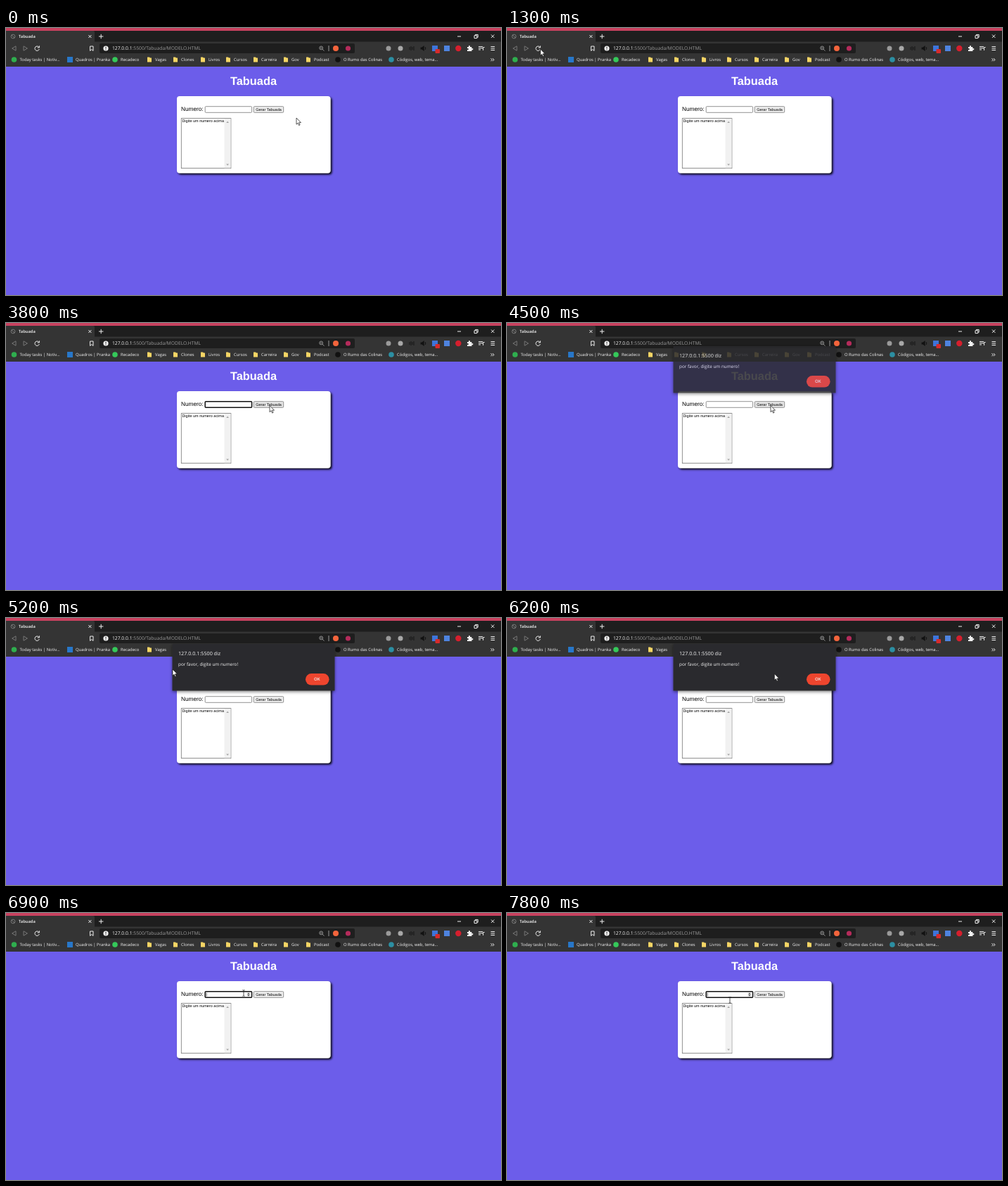
An HTML page for the animation above (8 s loop, 704 by 380 pixels).

```html
<!DOCTYPE html>
<html lang="pt-BR">
<head>
<meta charset="utf-8">
<title>Tabuada</title>
<style>
  html, body { margin: 0; width: 100%; height: 100%; overflow: hidden; background: #6c5dea; }
  svg { display: block; width: 704px; height: 380px; }
  text { white-space: pre; text-rendering: geometricPrecision; }
  .ui { font-family: "Open Sans", "Noto Sans", sans-serif; fill: #f4f4f4; }
  .page { font-family: "Liberation Sans", Arial, sans-serif; fill: #000; }
  .line { fill: none; stroke: #eee; stroke-width: 1; }
  .dim { stroke: #777; }
  .small { font-size: 5.9px; }
  .form { font-size: 5.5px; }
</style>
</head>
<body>
<svg viewBox="0 0 704 380">
  <defs>
    <filter id="cardShadow" x="-10%" y="-10%" width="120%" height="125%">
      <feDropShadow dx="2" dy="2" stdDeviation="1.6" flood-color="#000"/>
    </filter>
    <filter id="boxShadow" x="-10%" y="-20%" width="120%" height="150%">
      <feDropShadow dx="0" dy="1.5" stdDeviation="2" flood-color="#000" flood-opacity=".5"/>
    </filter>
  </defs>

  <!-- Page -->
  <rect width="704" height="380" fill="#6c5dea"/>
  <g class="page">
    <text x="352" y="81" text-anchor="middle" font-size="16.4" font-weight="700" style="fill:#fff">Tabuada</text>
    <rect x="243" y="97" width="218.5" height="109.5" rx="4" fill="#fff" filter="url(#cardShadow)"/>
    <text x="249" y="118.3" font-size="8.25">Numero:</text>
    <rect id="field" x="283.2" y="111.7" width="66.4" height="8.6" rx="1" fill="#fff" stroke="#767676" stroke-width=".8"/>
    <g id="spin">
      <rect x="342.5" y="113" width="5" height="6" fill="#ececec"/>
      <path d="M343.2 115.5l1.7-2 1.7 2zM343.2 116.6l1.7 2 1.7-2z" fill="#444"/>
    </g>
    <path id="caret" d="M285.2 113.3v5.6" stroke="#000" stroke-width=".6"/>
    <rect id="make" x="352.3" y="111.7" width="42.4" height="8.6" rx="1" fill="#efefef" stroke="#767676" stroke-width=".8"/>
    <text class="form" x="373.5" y="118" text-anchor="middle">Gerar Tabuada</text>
    <rect x="249.3" y="128.6" width="70.6" height="71" fill="#fff" stroke="#767676" stroke-width=".8"/>
    <rect x="310.5" y="129" width="9" height="70.2" fill="#f1f1f1"/>
    <path d="M313.2 135l1.9-2.2 1.9 2.2M313.2 193.6l1.9 2.2 1.9-2.2" fill="#a3a3a3"/>
    <text class="form" x="250.4" y="134.4">Digite um numero acima</text>
  </g>

  <!-- Browser frame -->
  <rect width="704" height="20" fill="#1e1e1e"/>
  <rect y="19.5" width="704" height="35.5" fill="#343434"/>
  <path d="M0 4H124q2 0 2 2V20H0z" fill="#343434"/>
  <rect width="704" height="4" fill="#c8415f"/>
  <g class="line dim">
    <circle cx="10" cy="12" r="2.9"/>
    <path d="M8 10l4 4"/>
  </g>
  <text class="ui" x="18" y="14.2" font-size="5.8" font-weight="600">Tabuada</text>
  <path class="line" d="M117.4 10l4 4m0-4l-4 4M132 12h6.4m-3.2-3.2v6.4"/>
  <path class="line" d="M642 12h5M666 10.8h3.8v3.8H666zM667.4 10.6V9.4h3.8v3.8H670M690 9.5l4.4 4.4m0-4.4l-4.4 4.4" stroke-width=".8"/>
  <path class="line dim" d="M14 25.8v6.4L8.6 29zM25 25.8v6.4l5.4-3.2z"/>
  <path class="line" d="M46.9 27.4a3.2 3.2 0 1 0 .4 2.6M47.4 25.3v2.6h-2.6M119.6 26h4.4v6.4l-2.2-1.9-2.2 1.9z"/>
  <rect x="133" y="22" width="363" height="14" rx="2" fill="#1e1e1e"/>
  <circle cx="142" cy="29" r="3.6" fill="#f0f0f0"/>
  <path d="M142 26.8v2.6m0 .8v1" stroke="#1e1e1e"/>
  <text class="ui" x="151" y="31.4" font-size="6.75">127.0.0.1<tspan fill="#999">:5500/Tabuada/MODELO.HTML</tspan></text>
  <g class="line" style="stroke:#999" stroke-width=".8">
    <circle cx="448.2" cy="28.4" r="2.4"/>
    <path d="M450 30.2l2.4 2.4M447 28.4h2.4M459 25v8"/>
  </g>
  <circle cx="469" cy="29" r="4" fill="#f4643c"/>
  <circle cx="486.5" cy="29" r="3.6" fill="#b52b5b"/>

  <!-- Extensions -->
  <circle cx="544" cy="29" r="3.5" fill="#9a9a9a"/>
  <circle cx="561" cy="29" r="3.5" fill="#a8a8a8"/>
  <path d="M574 27v4m2-5v6m2-5v4m2-5v6" stroke="#161616"/>
  <path d="M589.6 27.6h2l3-2.6v8l-3-2.6h-2z" fill="#111"/>
  <path d="M596 27q1.6 2 0 4" class="line" style="stroke:#111"/>
  <rect x="606" y="25" width="8" height="8" fill="#3d74da"/>
  <rect x="610.5" y="30" width="6.5" height="6" rx="1" fill="#d52b2b"/>
  <rect x="623" y="25" width="8" height="8" fill="#4e83df"/>
  <circle cx="643.3" cy="29" r="4.2" fill="#d51f2d"/>
  <path d="M656 27h2q-.6-2 1-2t1 2h2.4v2.2q2-.6 2 .9t-2 .9v2H656v-2q2 .3 2-1t-2-1z" fill="#f2f2f2"/>
  <path class="line" d="M672 26.5h6m-6 2.2h6m-6 2.2h3m3.6 1v-4.4h2M689.5 26.5h5.6m-5.6 2.5h5.6m-5.6 2.5h5.6"/>
  <g id="marks" class="ui small"></g>
  <path class="line" d="M689.5 43.2l2 2-2 2m2.6-4l2 2-2 2" stroke-width=".8"/>

  <!-- Alert -->
  <g id="alert" class="ui">
    <rect x="236.5" y="37" width="231" height="66.5" fill="#292a2d" filter="url(#boxShadow)"/>
    <text x="245" y="53" font-size="7.2">127.0.0.1:5500 diz</text>
    <text x="245" y="68.2" font-size="6.35">por favor, digite um numero!</text>
    <rect id="ok" x="426" y="79" width="33.6" height="16.6" rx="8.3" fill="#ee452e"/>
    <text x="442.4" y="89.4" font-size="6" font-weight="600" text-anchor="middle">OK</text>
  </g>

  <path id="arrow" d="M0 0v9.2l2.1-2 1.5 3.4 1.5-.7-1.5-3.2h2.9z" fill="#fff" stroke="#111" stroke-width=".7"/>
  <path id="beam" d="M-1.6-4.4q1.6 0 1.6.8v7.2q0 .8-1.6.8M1.6-4.4q-1.6 0-1.6.8M0 3.6q0 .8 1.6.8" fill="none" stroke="#222" stroke-width=".8"/>
</svg>
<script>
const $ = id => document.getElementById(id);
const LOOP = 8000, STEP = 100;

// Label, text x, icon colour; bookmarks without a colour are folders
const marks = [
  ["Today tasks | Notiv...", 19.5, "#2fae4e"], ["Quadros | Pranka", 99, "#2877c9", "square"],
  ["Recadeco", 163, "#35c85a"], ["Vagas", 212], ["Clones", 249], ["Livros", 288],
  ["Cursos", 324], ["Carreira", 363], ["Gov", 406], ["Podcast", 438],
  ["O Rumo das Colinas", 480, "#111"], ["Códigos, web, tema...", 556, "#2c8fa3"]
];

function icon(x, color, shape) {
  if (!color) return `<path d="M${x - 3} 41.5h3l1 1h2v6h-6z" fill="#f5d565"/>`;
  if (shape) return `<rect x="${x - 4}" y="41" width="8" height="8" fill="${color}"/>`;
  return `<circle cx="${x}" cy="45" r="3.8" fill="${color}"/>`;
}
$("marks").innerHTML = marks.map(([label, x, color, shape]) =>
  icon(x - 8, color, shape) + `<text x="${x}" y="47.4">${label}</text>`).join("");

// Pointer stops: time, x, y
const path = [
  [0, 413, 128], [1200, 413, 128], [1300, 47.5, 30], [1700, 47.5, 30],
  [2100, 248, 50], [2400, 296, 112], [2600, 299, 118.5], [3200, 299, 118.5],
  [3400, 345, 128], [3600, 382, 122], [3800, 375, 117.5], [4700, 375, 117.5],
  [4900, 330, 102], [5200, 237, 73], [5300, 237, 73], [5500, 285, 66],
  [5700, 331, 70], [6000, 331, 70], [6300, 405, 84], [6500, 437, 91],
  [6800, 437, 91], [6900, 338, 114], [7000, 317, 119], [7200, 317, 119],
  [7600, 317, 124], [LOOP, 317, 124]
];

function pointerAt(t) {
  const i = path.findIndex(p => p[0] > t);
  const [t0, x0, y0] = path[i - 1], [t1, x1, y1] = path[i];
  const k = (t - t0) / (t1 - t0);
  return [x0 + (x1 - x0) * k, y0 + (y1 - y0) * k];
}

const show = (id, on) => $(id).setAttribute("visibility", on ? "visible" : "hidden");
const within = (t, from, to) => t >= from && t < to;

function draw(now) {
  const t = Math.floor(now % LOOP / STEP) * STEP;
  const [x, y] = pointerAt(t);
  const beam = within(t, 2500, 3300) || t >= 6900;
  for (const id of ["arrow", "beam"]) $(id).setAttribute("transform", `translate(${x} ${y})`);
  show("arrow", !beam);
  show("beam", beam);
  show("spin", beam);

  const focusStart = within(t, 3000, 4300) ? 3000 : t >= 6800 ? 6800 : null;
  const focused = focusStart !== null;
  $("field").setAttribute("stroke", focused ? "#101010" : "#767676");
  $("field").setAttribute("stroke-width", focused ? 1.5 : .8);
  show("caret", focused && (t - focusStart) % 1000 < 500);
  $("make").setAttribute("fill", within(t, 3600, 4800) ? "#e5e5e5" : "#efefef");

  const opening = within(t, 4500, 4600);
  show("alert", within(t, 4500, 6800));
  $("alert").setAttribute("opacity", opening ? .85 : 1);
  $("alert").setAttribute("transform", `translate(0 ${opening ? -4 : 0})`);
  $("ok").setAttribute("stroke", within(t, 6400, 6800) ? "#a93424" : "none");
}

const start = performance.now();
function tick() {
  draw(performance.now() - start);
  requestAnimationFrame(tick);
}
tick();
</script>
</body>
</html>
```
